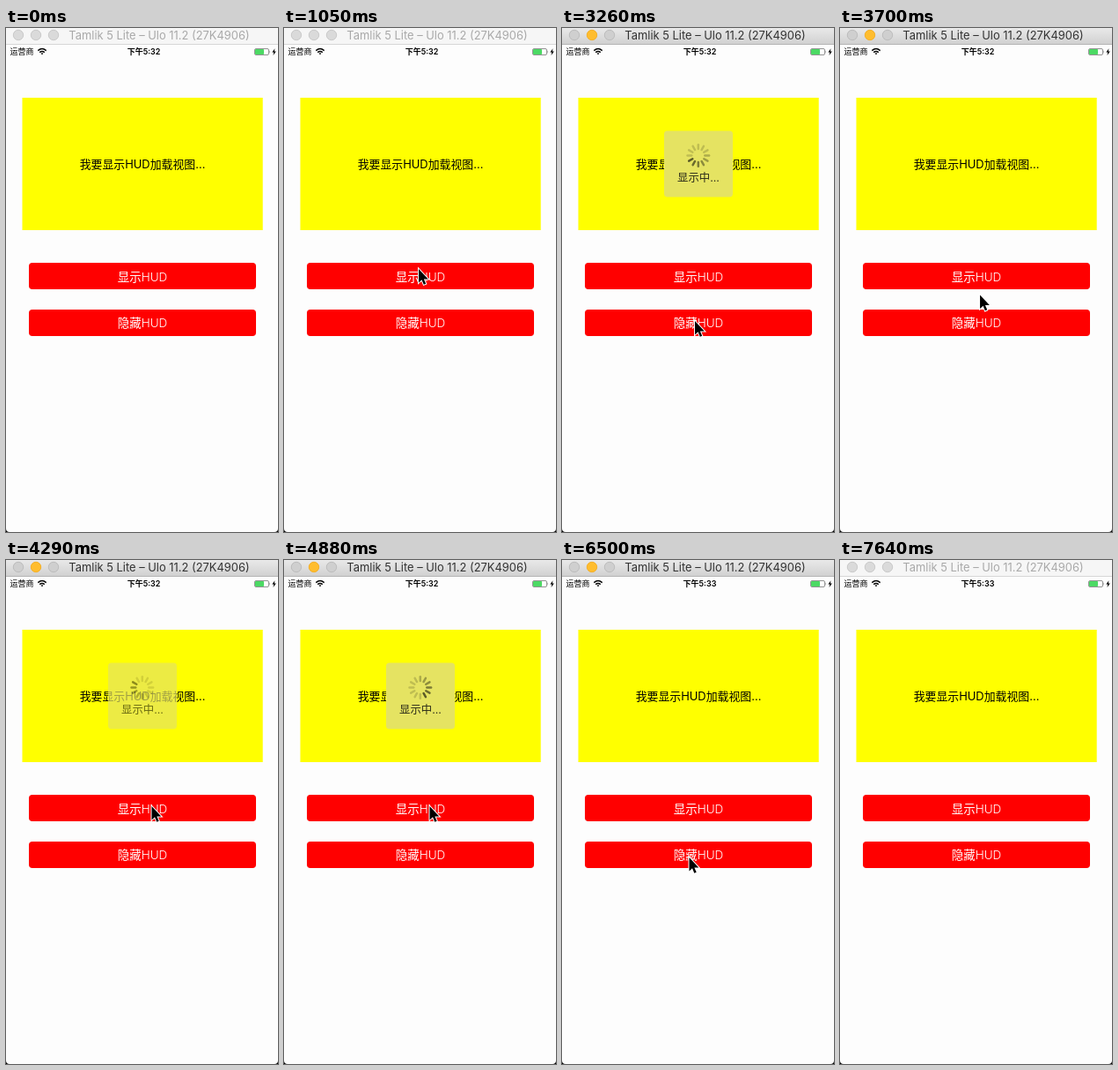
An HTML page for the animation above (7.74 s loop, 309 by 571 pixels).

```html
<!DOCTYPE html>
<html lang="zh-CN">
<head>
<meta charset="utf-8">
<style>
  html, body { margin: 0; width: 100%; height: 100%; overflow: hidden; background: #000; }
  svg { display: block; width: 100%; height: 100%; }
  text { font-family: Inter, "Noto Sans CJK SC", "Noto Sans CJK", sans-serif; text-anchor: middle; }
  .light { fill: #dadada; stroke: #cacaca; }
  .active .light { fill: #cfcfcf; stroke: #bdbdbd; }
  .active .mid { fill: #ffbd2e; stroke: #f3b02a; }
  #bar { fill: #f6f6f6; }
  .active #bar { fill: url(#metal); }
  #title { fill: #a9a9a9; font-size: 12.9px; }
  .active #title { fill: #333; }
  #edge { fill: #d6d6d6; }
  .active #edge { fill: #b4b4b4; }
  #cursor { stroke: #fff; stroke-width: 2; paint-order: stroke; }
</style>
</head>
<body>
<svg viewBox="0 0 309 571">
  <defs>
    <linearGradient id="metal" x2="0" y2="1">
      <stop stop-color="#e9e9e9"/><stop offset="1" stop-color="#d1d1d1"/>
    </linearGradient>
  </defs>
  <path d="M0 0H309V567Q309 571 305 571H4Q0 571 0 567Z" fill="#fdfdfd"/>

  <g id="window">
    <rect id="bar" width="309" height="18"/>
    <rect id="edge" y="18" width="309" height="1"/>
    <circle class="light" cx="14" cy="8" r="5.7"/>
    <circle class="light mid" cx="34" cy="8" r="5.7"/>
    <circle class="light" cx="54" cy="8" r="5.7"/>
    <text id="title" x="174" y="13">Tamlik 5 Lite – Ulo 11.2 (27K4906)</text>
  </g>

  <g font-size="9">
    <text x="18" y="30">运营商</text>
    <text id="clock" x="156.5" y="30" font-weight="600"></text>
  </g>
  <g fill="none" stroke="#000" stroke-width="1.4">
    <path d="M36.3 25.6Q41 21.6 45.7 25.6M38.2 27.6Q41 25.3 43.8 27.6"/>
    <path d="M41 30.3L39.6 28.8Q41 27.7 42.4 28.8Z" fill="#000" stroke="none"/>
  </g>
  <rect x="282.5" y="23.5" width="16" height="7" rx="1.5" fill="#fff" stroke="#777" stroke-width=".8"/>
  <rect x="283" y="24" width="10" height="6" rx=".8" fill="#4cd964"/>
  <path d="M299.5 25.5q1.4 1.5 0 3z" fill="#777"/>
  <path d="M305.5 23.2L302.3 27.6H304.3L303.5 31L306.8 26.5H304.8Z"/>

  <rect x="18.5" y="79" width="273.2" height="150" fill="#ff0"/>
  <text x="155" y="159" font-size="12.9">我要显示HUD加载视图...</text>

  <g fill="#f00">
    <rect x="26" y="266" width="258" height="30" rx="4"/>
    <rect x="26" y="319" width="258" height="30" rx="4"/>
  </g>
  <g fill="#fff" font-size="13.5" font-weight="300">
    <text x="155" y="286.5">显示HUD</text>
    <text x="155" y="339">隐藏HUD</text>
  </g>

  <g id="hud">
    <rect x="116" y="116.5" width="78" height="75" rx="3.7" fill="#e5e362"/>
    <g id="spinner" transform="translate(154.8 144.5)" stroke="#000" stroke-width="2.5" stroke-linecap="round"></g>
    <text x="155" y="174" font-size="12.4" fill="#2a2a18">显示中...</text>
  </g>

  <path id="cursor" d="M0 0V15.5L3.5 12.3L5.8 17.8L8.2 16.8L5.9 11.4H10.8Z"/>
</svg>
<script>
const $ = id => document.getElementById(id);
const LOOP = 7740, STEP = 147.6, BLUR = 7640;
const clamp = v => Math.min(1, Math.max(0, v));
const easeOut = f => 1 - (1 - f) ** 2;
const easeIn = f => f ** 2;

const enter = 2, exit = 49, focus = 9, minute = 37;
const huds = [{ show: 9, hide: 24 }, { show: 28, hide: 44 }];
const moves = [
  { from: enter, to: 7, x: 153, y: 273 },
  { from: 7, to: 9, x: 162.5, y: 281 },
  { from: 15, to: 18, x: 151, y: 332 },
  { from: 24, to: 27, x: 165.5, y: 279 },
  { from: 34, to: 40, x: 144.5, y: 337 },
  { from: 44, to: exit, x: 330, y: 690, ease: easeIn }
];

function pointer(k) {
  let x = 271, y = 295;
  for (const m of moves) {
    const f = (m.ease || easeOut)(clamp((k - m.from) / (m.to - m.from)));
    x += (m.x - x) * f;
    y += (m.y - y) * f;
  }
  return `translate(${x} ${y})`;
}

const spokes = Array.from({ length: 12 }, (_, i) => {
  const line = document.createElementNS("http://www.w3.org/2000/svg", "path");
  line.setAttribute("d", "M0 -7.5V-12.3");
  line.setAttribute("transform", `rotate(${i * 30})`);
  return $("spinner").appendChild(line);
});

function drawHud(k) {
  const { show, hide } = huds[k < huds[1].show ? 0 : 1];
  $("hud").setAttribute("opacity", clamp(Math.min((k - show) * .7, (hide - k) * .5)));
  // Twelve spokes per second, restarting with each showing.
  const head = Math.floor(((k - show) * STEP + 10) * .012) + 9;
  spokes.forEach((s, i) => {
    const lag = (head - i + 36) % 12;
    s.setAttribute("opacity", .6 * Math.max(.27, 1 - lag * .12));
  });
}

function draw(t) {
  const k = Math.floor(t / STEP);
  $("window").setAttribute("class", k >= focus && t < BLUR ? "active" : "");
  $("clock").textContent = k < minute ? "下午5:32" : "下午5:33";
  $("cursor").setAttribute("transform", pointer(k));
  $("cursor").setAttribute("visibility", k >= enter && k < exit ? "visible" : "hidden");
  drawHud(k);
}

const start = performance.now();
function tick() {
  draw((performance.now() - start) % LOOP);
  requestAnimationFrame(tick);
}
tick();
</script>
</body>
</html>
```
